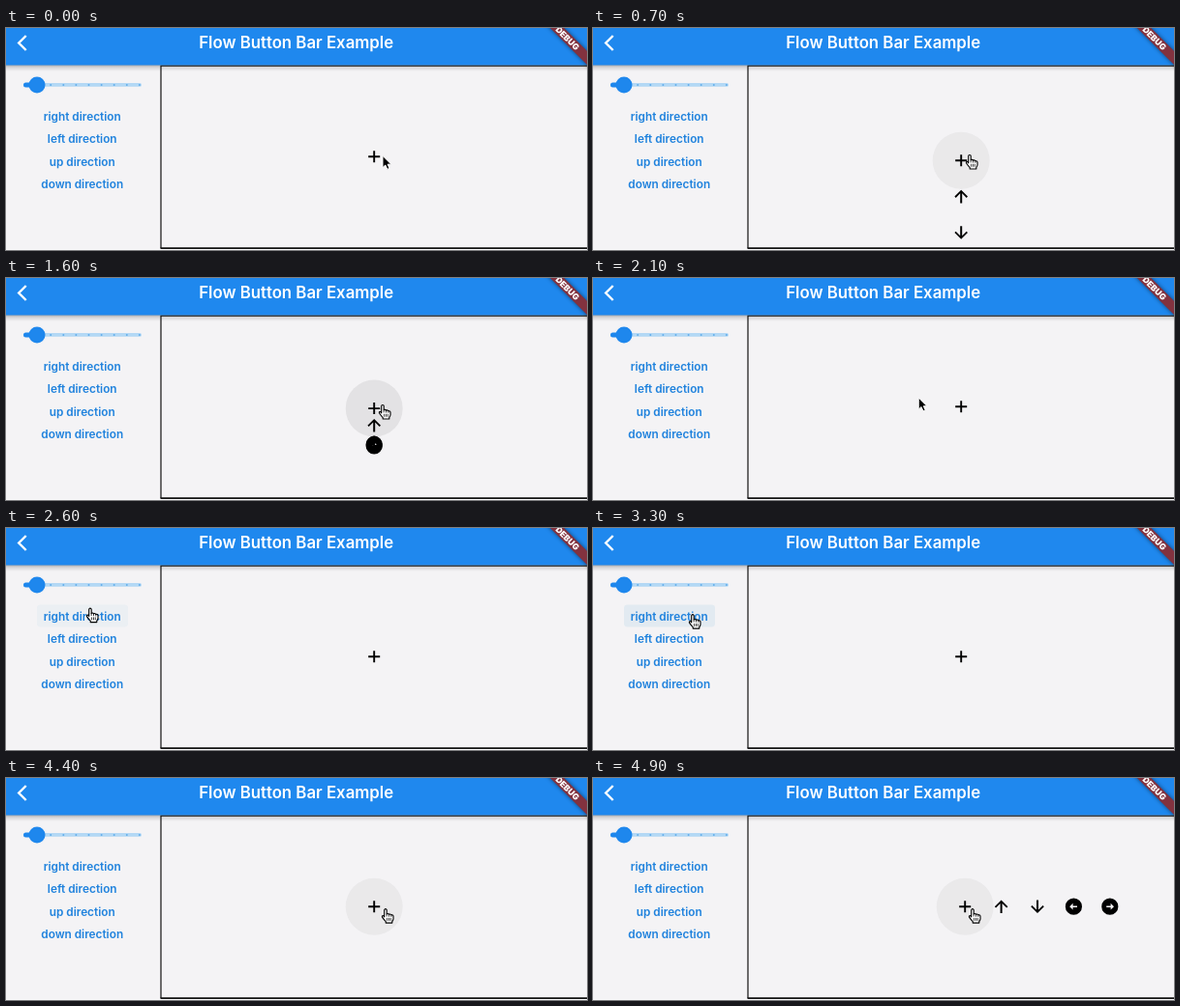
An HTML page for the animation above (5000 ms loop, 600 by 230 pixels).

```html
<!DOCTYPE html>
<html lang="en">
<head>
<meta charset="utf-8">
<title>Flow Button Bar Example</title>
<style>
  html, body { margin: 0; width: 100%; height: 100%; overflow: hidden; background: #fff; }
  svg { display: block; width: 600px; height: 230px; font-family: Inter, Roboto, sans-serif; }
  text { text-anchor: middle; fill: #fff; font-weight: 600; }
  .links text { font-size: 11.8px; fill: #1f82dd; }
  .title { font-size: 16.8px; }
  .debug { font-size: 8.7px; font-weight: 900; }
</style>
</head>
<body>
<svg viewBox="0 0 600 230">
  <defs>
    <linearGradient id="shade" x1="0" y1="0" x2="0" y2="1">
      <stop offset="0" stop-opacity=".32"/>
      <stop offset=".4" stop-opacity=".12"/>
      <stop offset="1" stop-opacity="0"/>
    </linearGradient>
    <filter id="blur" x="-20%" y="-80%" width="140%" height="260%"><feGaussianBlur stdDeviation="2"/></filter>
  </defs>

  <rect width="600" height="229.5" fill="#f4f3f5"/>
  <path d="M600 39.2H160V228" fill="none" stroke="#111" stroke-width="1.2"/>
  <path d="M159.5 228.1H600" stroke="#111" stroke-width="1.8"/>

  <rect id="glow" x="32" y="79.5" width="94" height="23" rx="3.4" fill="#2a90c4"/>
  <g class="links">
    <text x="78.7" y="95.6">right direction</text>
    <text x="78.7" y="119.2">left direction</text>
    <text x="78.7" y="142.8">up direction</text>
    <text x="78.7" y="166.2">down direction</text>
  </g>

  <rect x="18" y="57" width="122" height="3.8" rx="1.9" fill="#b3d8f5"/>
  <rect x="18" y="56.4" width="14" height="5" rx="2.5" fill="#1e87ed"/>
  <g id="ticks" fill="#64aeea"></g>
  <circle cx="32" cy="58.9" r="8.5" fill="#1e87ed"/>

  <circle id="halo" r="29.5"/>
  <path id="plus" d="M-6 0H6M0-6V6" stroke="#000" stroke-width="1.9"/>
  <g id="icons"></g>

  <rect y="38" width="600" height="7" fill="url(#shade)"/>
  <rect width="600" height="38.5" fill="#1f88ee"/>
  <path d="M20.7 8L13.2 15.5L20.7 23" fill="none" stroke="#fff" stroke-width="2.4"/>
  <text class="title" x="299.7" y="21.2">Flow Button Bar Example</text>

  <g transform="translate(600 -10) rotate(45)">
    <rect x="-40" y="23.8" width="80" height="10.2" filter="url(#blur)" opacity=".5"/>
    <rect x="-40" y="23.8" width="80" height="10.2" fill="#82323f"/>
    <text class="debug" x=".4" y="32.1">DEBUG</text>
  </g>

  <path id="arrow" d="M0 0V12.2L2.8 9.6L4.8 14L7 13L5.1 8.8H8.8Z" stroke="#fff" stroke-linejoin="round"/>
  <g id="hand" stroke="#000" stroke-width="1.1" stroke-linejoin="round" stroke-linecap="round">
    <path fill="#fff" d="M-1.3 7.4V.4A1.25 1.25 0 0 1 1.2 .4V4.4Q2.4 3.3 3.5 4.8Q4.8 3.9 5.8 5.4Q7.8 4.9 8 6.9V9.4Q7.8 11 6.8 12V13.6H.2V12.2Q-1.6 10.4-3.5 7.6Q-3.9 5.7-2.3 6.2Z"/>
    <path fill="none" d="M1.2 4.4V6.6M3.5 4.8V6.8M5.8 5.4V7M1.6 8.8V11M3.5 8.8V11M5.3 8.8V11" stroke-width=".75"/>
  </g>
</svg>
<script>
const LOOP = 5000, CX = 380.2, CY = 133.2, GAP = 37.4, SHIFT = 4;
const $ = id => document.getElementById(id);

let ticks = "";
for (let k = 2; k < 10; k++) ticks += `<circle cx="${20 + k * 13.1}" cy="58.9" r="1"/>`;
$("ticks").innerHTML = ticks;

const icon = (shape, turn) => `<g><path fill-rule="evenodd" transform="rotate(${turn})" d="${shape}"/></g>`;
const upward = "M-6.8 0L0-6.8L6.8 0L5.5 1.3L1-3.3V6.8H-1V-3.3L-5.5 1.3Z";
// Disc with the arrow cut out of it
const disc = "M-8.6 0A8.6 8.6 0 0 1 8.6 0A8.6 8.6 0 0 1-8.6 0ZM-3.6-.8H.8V-3.4L4.2 0L.8 3.4V.8H-3.6Z";
$("icons").innerHTML = icon(upward, 0) + icon(upward, 180) + icon(disc, 180) + icon(disc, 0);
const icons = [...$("icons").children];

const place = (el, x, y) => el.setAttribute("transform", `translate(${x.toFixed(2)} ${y.toFixed(2)})`);
const show = (el, on) => el.style.display = on ? "" : "none";

function draw(t) {
  const ramp = (a, b) => Math.min(1, Math.max(0, (t - a) / (b - a)));
  const glide = (a, b) => (1 - Math.cos(Math.PI * ramp(a, b))) / 2;

  // Folding in, the discs first gather near the second arrow
  const open = ramp(200, 600) - ramp(1100, 2050) + ramp(4400, 4850);
  const spread = 1 - .9 * (ramp(950, 1200) - ramp(2050, 2100));
  const sideways = t > 3000;
  const put = (el, slot) => {
    const d = open * (SHIFT + GAP * slot);
    place(el, CX + (sideways ? d : 0), CY + (sideways ? 0 : d));
  };
  put($("plus"), 0);
  put($("halo"), 0);
  icons.forEach((el, i) => {
    const slot = i + 1;
    put(el, slot < 3 ? slot : 2 + (slot - 2) * spread);
    show(el, open > .01);
  });

  const hover = ramp(100, 250) - ramp(1900, 2050) + ramp(4080, 4250);
  const press = ramp(950, 1150) - ramp(1700, 1900);
  $("halo").setAttribute("opacity", .045 * hover + .027 * press);
  const lit = ramp(2400, 2520) - ramp(3350, 3520);
  const splash = ramp(2850, 3050) - ramp(3350, 3520);
  $("glow").setAttribute("opacity", .045 * lit + .04 * splash);

  // Pointer trip: to the first link, along it, back in a sagging arc, onto the plus
  const away = glide(1950, 2500), along = glide(2650, 3000);
  const back = glide(3450, 3860), settle = glide(3950, 4250);
  const x = 389 - 302 * away + 16 * along + 299 * back - 10 * settle;
  const y = 132.4 - 48.4 * away + 6.5 * along + 48.5 * back + 40 * Math.sin(Math.PI * back) - 2.5 * settle;
  const pointing = (t > 90 && t < 2010) || (t > 2380 && t < 3490) || t > 4080;
  for (const id of ["hand", "arrow"]) {
    place($(id), x, y);
    show($(id), pointing === (id === "hand"));
  }
}

const start = performance.now();
function tick() {
  draw((performance.now() - start) % LOOP);
  requestAnimationFrame(tick);
}
draw(0);
requestAnimationFrame(tick);
</script>
</body>
</html>
```
